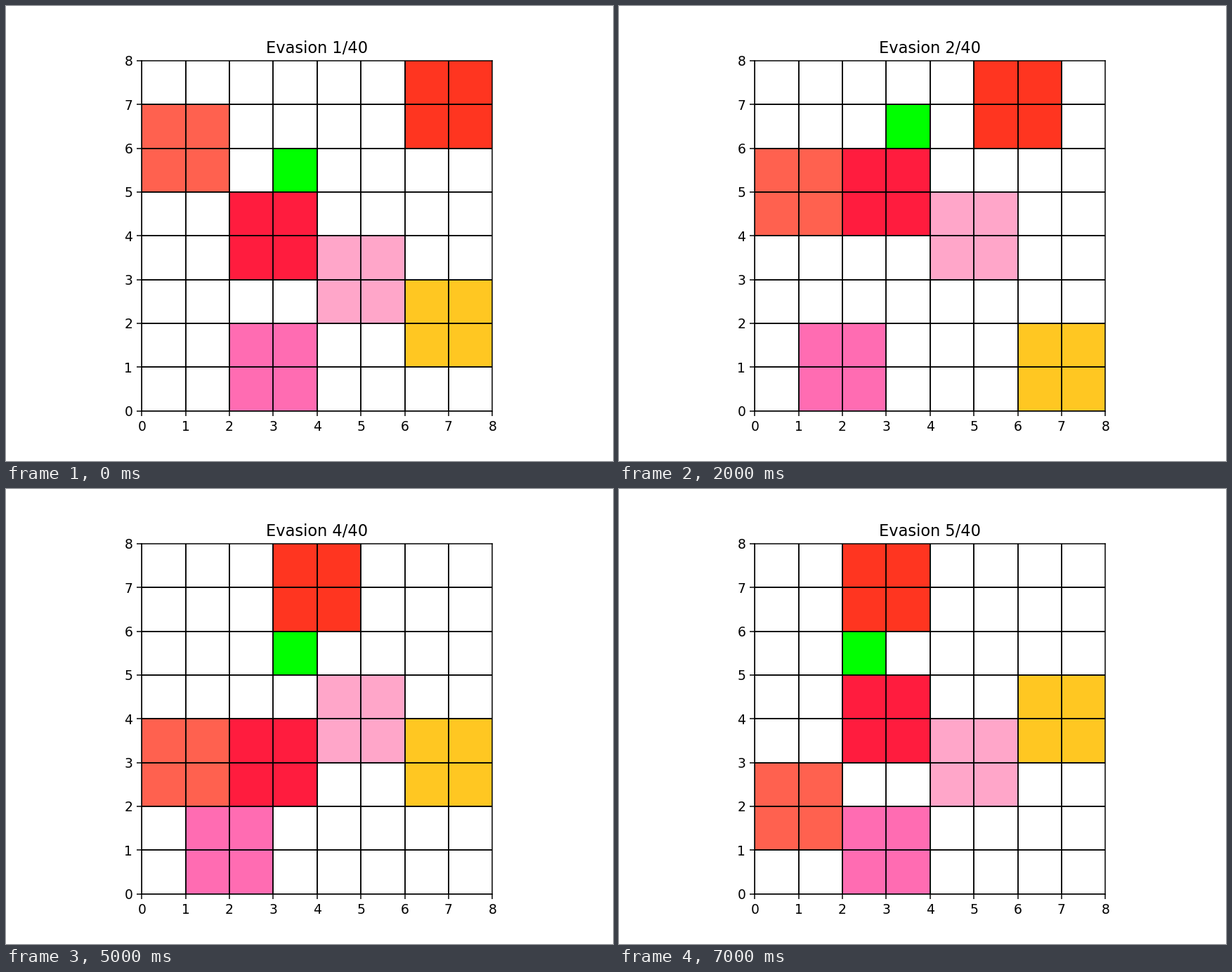
A matplotlib script for the animation above (8000 ms loop, 864 by 648 pixels).

```python
import matplotlib.pyplot as plt
from matplotlib.animation import FuncAnimation
from matplotlib.patches import Rectangle

SIZE = 8
ROUNDS = 40

# Each block slides along one axis: colour, fixed axis, fixed value, path per round
BLOCKS = [
    ("#FF614F", "x", 0, [5, 4, 3, 2, 1]),
    ("#FF3520", "y", 6, [6, 5, 4, 3, 2]),
    ("#FF1C3E", "x", 2, [3, 4, 3, 2, 3]),
    ("#FFA6C9", "x", 4, [2, 3, 4, 3, 2]),
    ("#FF6CB2", "y", 0, [2, 1, 0, 1, 2]),
    ("#FFC722", "x", 6, [1, 0, 1, 2, 3]),
]

# Per tick: the round (from 0) and the runner's cell
ROUND_AT = [0, 0, 1, 2, 2, 3, 4, 4]
RUNNER_AT = [(3, 5), (3, 6), (3, 6), (3, 6), (3, 5), (3, 5), (3, 5), (2, 5)]

fig, ax = plt.subplots(figsize=(6.4, 4.8), dpi=135)
fig.set_facecolor("white")
ax.set_aspect("equal")
ax.set_xlim(0, SIZE)
ax.set_ylim(0, SIZE)
ax.set_xticks(range(SIZE + 1))
ax.set_yticks(range(SIZE + 1))
title = ax.set_title("")

for k in range(SIZE):
    ax.axvline(k, color="black", lw=1, zorder=2)
    ax.axhline(k, color="black", lw=1, zorder=2)


def add_square(side, color):
    return ax.add_patch(Rectangle((0, 0), side, side, fc=color, lw=0, zorder=1))


squares = [add_square(2, block[0]) for block in BLOCKS]
runner = add_square(1, "#00FF00")


def update(tick):
    rnd = ROUND_AT[tick]
    title.set_text(f"Evasion {rnd + 1}/{ROUNDS}")
    for square, (_, axis, fixed, path) in zip(squares, BLOCKS):
        square.set_xy((fixed, path[rnd]) if axis == "x" else (path[rnd], fixed))
    runner.set_xy(RUNNER_AT[tick])
    return [title, runner, *squares]


anim = FuncAnimation(fig, update, frames=len(ROUND_AT), interval=1000,
                     repeat=True, repeat_delay=0, blit=False)
plt.show()
```
